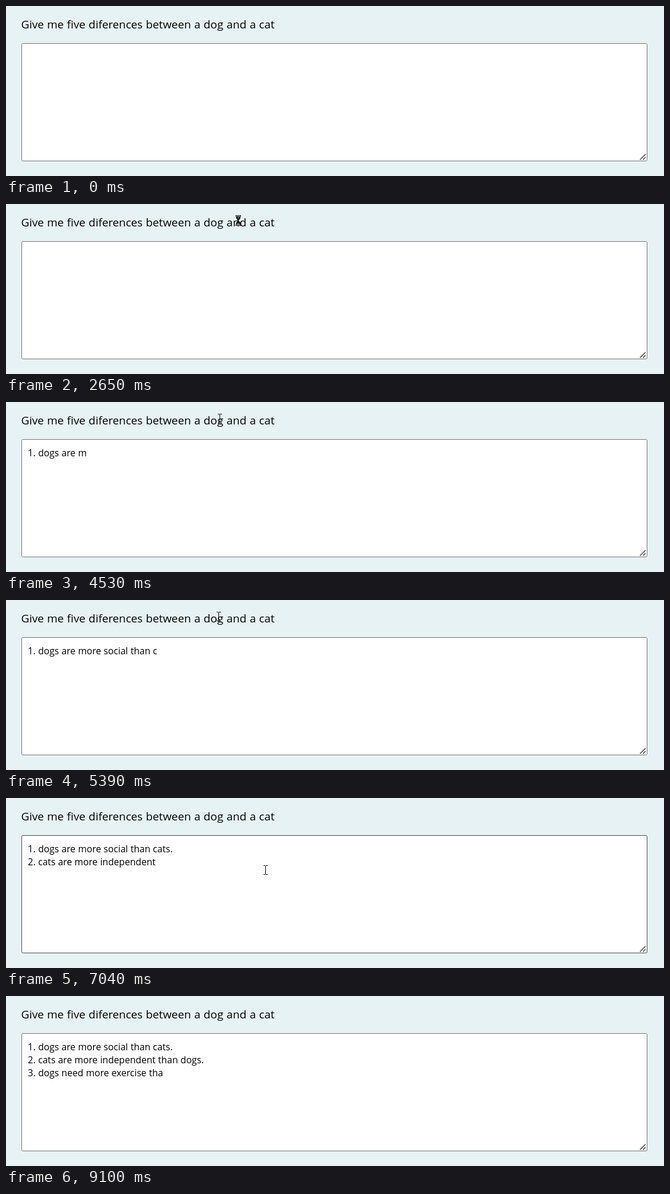
An HTML page for the animation above (9.17 s loop, 1109 px wide and 288 px high).

```html
<!DOCTYPE html>
<html lang="en">
<head>
<meta charset="utf-8">
<title>Typed answer</title>
<style>
  html, body { margin: 0; width: 100%; height: 100%; overflow: hidden; background: #e7f2f4; }
  svg { display: block; width: 1109px; height: 288px; }
  text { font-family: "Open Sans", "Noto Sans", sans-serif; fill: #000; white-space: pre; }
  #title { font-size: 18.8px; word-spacing: .6px; }
  #answer text { font-size: 15.65px; word-spacing: .25px; }
  #box { fill: #fff; stroke: #767676; }
  #box.hover { stroke: #4f4f4f; }
  #click { fill: #ff0; fill-opacity: .47; }
  #cursor > g { visibility: hidden; }
  #cursor > g.on { visibility: visible; }
</style>
</head>
<body>
<svg viewBox="0 0 1109 288">
  <text id="title" x="25.5" y="38">Give me five diferences between a dog and a cat</text>
  <rect id="box" x="26.5" y="63.5" width="1054" height="199" rx="2"/>
  <path d="M1068.5 260.5l9.5-9.5M1073.5 260.5l4.5-4.5" stroke="#484848" stroke-width="1.5"/>
  <g id="answer">
    <text x="36.8" y="92"></text>
    <text x="36.8" y="114"></text>
    <text x="36.8" y="136"></text>
  </g>
  <circle id="click" cx="343" cy="26" r="15"/>
  <g id="cursor">
    <g id="arrow">
      <path d="M0 0V13.5L3 10.8L5.6 17L8 16L5.5 10H9.3Z" stroke="#fff" stroke-width="1.2" paint-order="stroke"/>
    </g>
    <g id="hand" fill="#fff" stroke="#222" stroke-width="1.1" stroke-linejoin="round">
      <path d="M-1.5 2Q-1.5 .5 0 .5T1.5 2V8Q4 7 5 9Q7.5 8.3 8 10Q10.5 9.5 10.5 12V16Q10.5 19 8.5 21V22.5H0V20.5L-4.5 14.5Q-5.5 12.5-4 12T-1.5 14Z"/>
      <path d="M1.5 8V12M5 9V12.5M8 10V13"/>
    </g>
    <g id="beam" fill="none" stroke="#000">
      <path d="M-3 -7.5H0M1 -7.5H4M.5 -7V7M-3 7.5H0M1 7.5H4"/>
    </g>
    <g id="wait">
      <path d="M-4 -9H5V-6.5H4V-4L1.5 -.5V.5L4 4V6.5H5V9H-4V6.5H-3V4L-.5 .5V-.5L-3 -4V-6.5H-4Z"/>
      <path d="M-3 -7.5H4M-3 7.5H4M-1 -4.5H2M-1.5 5.5H2.5" stroke="#fff"/>
    </g>
  </g>
</svg>
<script>
  const LOOP = 9170, STEP = 66.4, PHASE = 2060;
  const TYPE_START = 3832, CHAR_MS = 50;
  const ENTER = 260, PRESS = 1290, ASK = 1390, ANSWER = 3900;

  const lines = [
    "1. dogs are more social than cats.",
    "2. cats are more independent than dogs.",
    "3. dogs need more exercise than cats."
  ];

  // time, x, y of the pointer's hot spot
  const path = [
    [ENTER, 520, 280], [1060, 344, 26], [PHASE, 343, 26], [2650, 391, 28],
    [3200, 402, 35], [3860, 362, 28], [5400, 358, 28], [6177, 378, 51],
    [7000, 426, 121], [7580, 590, 141], [8036, 826, 197], [8510, 1054, 257],
    [8700, 1062, 310]
  ];

  const get = id => document.getElementById(id);
  const box = get("box"), click = get("click"), cursor = get("cursor");
  const rows = [...get("answer").children];
  const shapes = [...cursor.children];

  function pointAt(t) {
    const next = path.findIndex(p => p[0] > t);
    const i = next < 0 ? path.length - 1 : Math.max(1, next);
    const [t0, x0, y0] = path[i - 1], [t1, x1, y1] = path[i];
    const k = Math.min(1, Math.max(0, (t - t0) / (t1 - t0)));
    return [Math.round(x0 + (x1 - x0) * k), Math.round(y0 + (y1 - y0) * k)];
  }

  function shapeAt(t, y, inBox) {
    if (t < ENTER) return "";
    if (t >= ASK && t < ANSWER) return "wait";
    if (inBox) return "beam";
    if (y < 42) return t < ASK ? "hand" : "beam";
    return "arrow";
  }

  function type(t) {
    let left = Math.floor((t - TYPE_START) / CHAR_MS);
    lines.forEach((line, i) => {
      rows[i].textContent = line.slice(0, Math.max(0, left));
      left -= line.length + 1;
    });
  }

  function draw(now) {
    const raw = now % LOOP;
    // the picture advances about fifteen times a second
    const t = PHASE + Math.floor((raw - PHASE) / STEP + .1) * STEP;
    const [x, y] = pointAt(t);
    const inBox = y >= 63 && y < 263;
    const shape = shapeAt(raw, y, inBox);
    type(t);
    box.classList.toggle("hover", inBox && shape !== "");
    click.style.visibility = raw >= PRESS && raw < ASK ? "visible" : "hidden";
    cursor.setAttribute("transform", `translate(${x} ${y})`);
    shapes.forEach(s => s.classList.toggle("on", s.id === shape));
  }

  const start = performance.now();
  function tick() {
    draw(performance.now() - start);
    requestAnimationFrame(tick);
  }
  tick();
</script>
</body>
</html>
```
